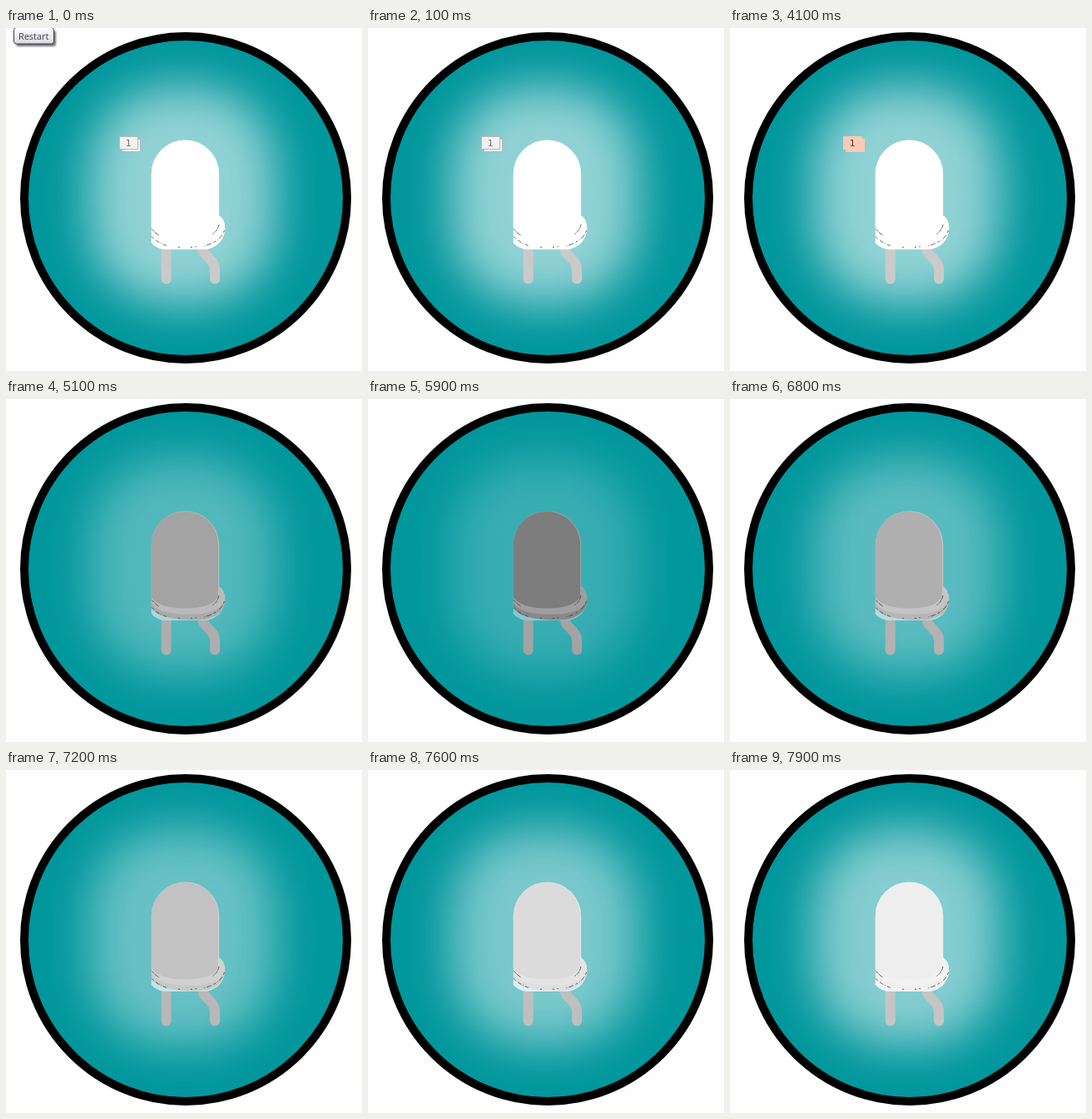
An HTML page that plays this animation: 428 by 412 pixels, repeating every 8000 ms.

```html
<!DOCTYPE html>
<html lang="en">
<head>
<meta charset="utf-8">
<title>LED pulse</title>
<style>
  html, body { margin: 0; width: 100%; height: 100%; overflow: hidden; background: #fefefe; }
  svg { display: block; width: 428px; height: 412px; }
  text { text-anchor: middle; }
</style>
</head>
<body>
<svg viewBox="0 0 428 412">
  <defs>
    <filter id="soft" filterUnits="userSpaceOnUse" x="-40" y="-40" width="508" height="492" color-interpolation-filters="sRGB">
      <feGaussianBlur stdDeviation="28"/>
    </filter>
    <filter id="drop" x="-20%" y="-20%" width="150%" height="170%">
      <feGaussianBlur stdDeviation="1"/>
    </filter>
    <linearGradient id="face" x2="0" y2="1">
      <stop offset="0" stop-color="#fff"/>
      <stop offset="1" stop-color="#d9d9e6"/>
    </linearGradient>
    <clipPath id="disc"><circle cx="216" cy="204" r="190"/></clipPath>
    <clipPath id="base"><path d="M175 225H256Q263.3 230 263.3 240C263 254 254 265 238 266H190Q180 264.5 174.7 258Z"/></clipPath>
  </defs>

  <circle cx="216" cy="204" r="194" fill="#00979d"/>
  <g clip-path="url(#disc)">
    <rect id="glow" x="100" y="70" width="224" height="262" rx="98" fill="#fff" filter="url(#soft)"/>
  </g>
  <circle cx="216" cy="204" r="194" fill="none" stroke="#000" stroke-width="10"/>

  <g id="legs" fill="none" stroke-width="12" stroke-linecap="round">
    <path d="M192.7 262V301.5"/>
    <path d="M236.7 262V264Q236.7 269 240 272L247 279.5Q251.2 284 251.2 290V301.5"/>
  </g>

  <g clip-path="url(#base)">
    <rect id="rim" x="174" y="224" width="90" height="43"/>
    <path id="low" d="M175 240H264V243Q260 261 238 265Q203 267 184 259Q176 254 175 250Z"/>
    <path id="high" d="M175 232L256 226Q264 230 263 241Q258 255 236 258Q200 261 182 252Q176 248 175 244Z"/>
  </g>
  <path id="edge" d="M174.8 175.2A40.7 40.7 0 0 1 256.2 175.2V238Q247 251 215.5 251Q184 251 174.8 238Z"/>
  <path id="body" d="M174.8 175.2A40.2 40.2 0 0 1 255.2 175.2V238Q246 251.5 215.5 251.5Q184 251.5 174.8 238Z"/>

  <g fill="none" stroke="#3c3c3c" stroke-width=".8">
    <path d="M175.5 241.5Q179 246 184.5 249.5" stroke-dasharray="4 1 6 2"/>
    <path d="M175 250.5Q181 257 193 261.5" stroke-dasharray="4 3 5 2 1 2"/>
    <path d="M256 236Q255 243 248.5 247.5" stroke-dasharray="5 1"/>
    <path d="M262.5 243Q259 256 238 262" stroke-dasharray="3 3 6 2 1 2"/>
    <path d="M207 263.3h2M222 263.3h2M227.5 262.6h1.5"/>
  </g>

  <g id="tag">
    <g id="cards" stroke-width="1">
      <rect x="139.5" y="133.5" width="22" height="15"/>
      <rect x="136.5" y="130.5" width="22" height="15"/>
    </g>
    <text id="digit" x="147.3" y="142" font-family="'DejaVu Sans', sans-serif" font-size="11">1</text>
  </g>

  <g id="button">
    <rect x="12" y="3" width="48" height="19" rx="3" fill="#000" opacity=".55" filter="url(#drop)"/>
    <rect x="9.5" y="-.5" width="48" height="19.5" rx="3" fill="url(#face)" stroke="#3d3d4c"/>
    <text x="33.2" y="14" font-family="'Open Sans', sans-serif" font-size="11" fill="#404040">Restart</text>
  </g>
</svg>
<script>
const LOOP = 8000, TICK = 100;
const FULL = 255, OFF = 119;
const el = id => document.getElementById(id);
const set = (id, attrs) => {
  for (const name in attrs) el(id).setAttribute(name, attrs[name]);
};
const show = (id, on) => set(id, { visibility: on ? 'visible' : 'hidden' });
const gray = v => `rgb(${v},${v},${v})`;
const toWhite = (v, k) => v + (255 - v) * k;

// Lamp level per tick: half-second fade out, a rest, then a slow rise with two short stalls.
function level(k) {
  if (k < 48) return FULL;
  if (k < 59) return FULL - (FULL - OFF) * Math.min(1, (k - 47.6) / 5);
  return OFF + 6.25 * (k - 58 - (k >= 67) - (k >= 71));
}

function draw(ms) {
  const k = Math.floor(ms / TICK);
  const v = level(k), dim = FULL - v;
  const hot = k >= 41;

  set('glow', { opacity: 0.57 - dim * 0.0027 });
  set('legs', { stroke: gray(202 - dim * 0.3) });
  set('body', { fill: gray(v) });
  set('edge', { fill: gray(toWhite(v, 0.3)) });
  set('high', { fill: gray(toWhite(v, 0.25)) });
  set('low', { fill: gray(toWhite(v, 0.08)) });
  set('rim', { fill: `rgb(${255 - dim * 0.95},${255 - dim * 0.42},${255 - dim * 0.4})` });

  show('button', k < 1);
  show('tag', k < 48);
  set('cards', { fill: hot ? '#fdc9b4' : '#f1f2f0', stroke: hot ? '#fdc9b4' : '#bcb9b5' });
  set('digit', { fill: hot ? '#4a3b35' : '#747474' });
}

const start = performance.now();
function frame() {
  draw((performance.now() - start) % LOOP);
  requestAnimationFrame(frame);
}
draw(0);
requestAnimationFrame(frame);
</script>
</body>
</html>
```
